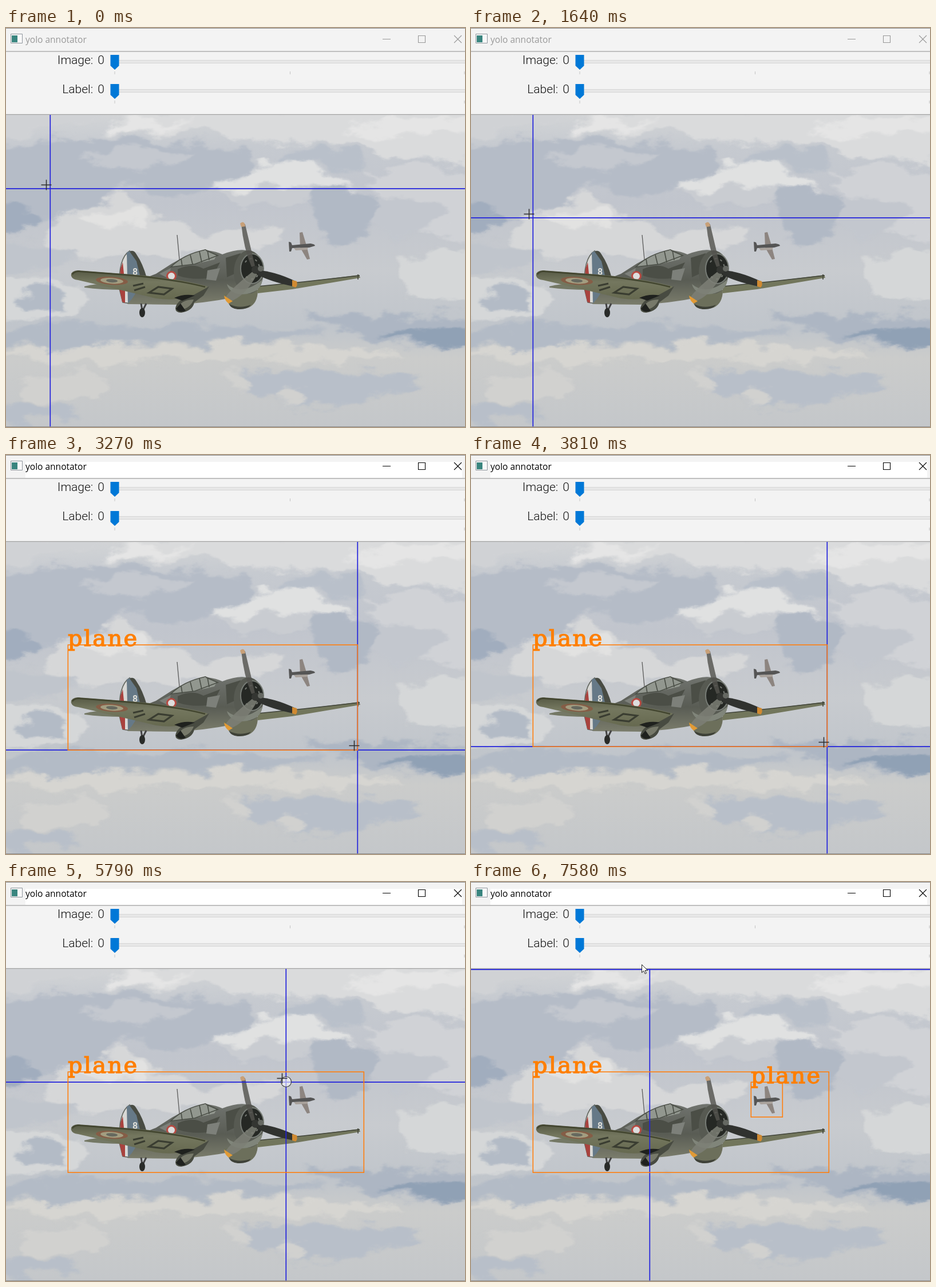
Animation of 802 by 698 pixels, one loop 8000 ms. Source, as an HTML page:

```html
<!DOCTYPE html>
<html lang="en">
<head>
<meta charset="utf-8">
<title>yolo annotator</title>
<style>
  html, body { margin: 0; width: 100%; height: 100%; overflow: hidden; background: #f3f3f3; }
  svg { position: absolute; left: 0; top: 0; width: 802px; height: 698px; }
  .title { font: 15.5px "Open Sans", sans-serif; }
  .field { font: 300 21px Roboto, sans-serif; word-spacing: 3px; text-anchor: end; fill: #111; }
  .tag { font: 40px "DejaVu Serif", serif; letter-spacing: 2.4px; fill: #ff7f00; stroke: #ff7f00; stroke-width: 1.3; }
  .box { fill: none; stroke: #ff7f0e; stroke-width: 1.6; }
  #cross { stroke: #2222dc; stroke-width: 1.7; }
</style>
</head>
<body>
<svg viewBox="0 0 802 698">
  <defs>
    <linearGradient id="sky" x2="0" y2="1">
      <stop stop-color="#d2d4d6"/>
      <stop offset=".1" stop-color="#c6cad0"/>
      <stop offset=".28" stop-color="#c1c5cd"/>
      <stop offset=".5" stop-color="#c8cbcf"/>
      <stop offset=".68" stop-color="#c0c5cb"/>
      <stop offset=".78" stop-color="#cbcccb"/>
      <stop offset="1" stop-color="#c4c7ca"/>
    </linearGradient>
    <filter id="ragged" filterUnits="userSpaceOnUse" x="-40" y="110" width="882" height="640" color-interpolation-filters="sRGB">
      <feTurbulence type="fractalNoise" baseFrequency=".016 .03" numOctaves="5" seed="7" result="n"/>
      <feGaussianBlur in="SourceGraphic" stdDeviation="2.5"/>
      <feDisplacementMap in2="n" scale="50" xChannelSelector="R" yChannelSelector="G"/>
    </filter>
    <filter id="soft"><feGaussianBlur stdDeviation=".7"/></filter>
    <clipPath id="photo"><path d="M0 152H802V697H0Z"/></clipPath>
    <linearGradient id="body" x2="0" y2="1">
      <stop stop-color="#70736e"/>
      <stop offset=".55" stop-color="#595c54"/>
      <stop offset="1" stop-color="#7b7d6c"/>
    </linearGradient>
    <linearGradient id="wing" x2="0" y2="1">
      <stop stop-color="#565944"/>
      <stop offset=".4" stop-color="#74775f"/>
      <stop offset="1" stop-color="#66694f"/>
    </linearGradient>
  </defs>

  <g clip-path="url(#photo)">
    <path fill="url(#sky)" d="M0 152H802V698H0Z"/>
    <g filter="url(#ragged)">
      <path fill="#d0d2d5" d="M-30 140H200Q150 185-30 186Z"/>
      <path fill="#b5bcc7" d="M-30 208Q150 186 300 200T420 215Q440 260 370 280Q270 300 240 272Q190 265 170 300Q120 318 80 335L-30 350Z"/>
      <path fill="#c4c8cf" d="M130 225Q230 205 330 222Q280 250 190 246Z"/>
      <path fill="#a1adbe" d="M-30 318Q30 308 62 332Q40 358-30 366Z"/>
      <path fill="#dadbdc" d="M170 186Q200 140 300 140H840V235Q710 235 640 215Q560 190 470 200Q380 195 300 180Z"/>
      <path fill="#e5e5e5" d="M600 172Q680 150 830 150V180Q700 195 600 182ZM180 170Q240 155 330 165Q260 180 180 182Z"/>
      <path fill="#b9c0ca" d="M490 215Q560 200 610 222Q640 235 620 255Q560 246 490 230Z"/>
      <path fill="#d0d2d6" d="M630 250Q720 235 840 250V360Q730 370 650 330Z"/>
      <path fill="#b1b9c5" d="M530 292Q580 276 630 290Q660 320 640 350Q610 385 565 370Q530 355 530 292Z"/>
      <path fill="#c3c7ce" d="M640 300Q720 290 762 320Q745 350 690 370Q650 360 640 300Z"/>
      <path fill="#e0e1e1" d="M370 280Q380 250 420 250Q440 226 480 232Q520 226 540 250Q580 258 622 280Q560 288 500 278Q440 298 370 280Z"/>
      <path fill="#c9ccd1" d="M375 285Q450 268 540 285Q530 318 450 312Q400 310 375 285Z"/>
      <path fill="#d6d7d8" d="M78 350Q90 320 130 320Q140 298 180 302Q200 275 215 288Q220 318 250 326Q300 345 340 360Q420 340 490 345Q480 395 400 390L110 400Q50 390 78 350Z"/>
      <path fill="#e2e2e1" d="M125 332Q160 312 215 322Q245 330 250 348Q180 354 125 332Z"/>
      <path fill="#c0c5cc" d="M-30 375Q60 368 125 395Q110 428-30 428Z"/>
      <path fill="#d5d7d8" d="M680 400Q760 375 840 385V485Q740 490 690 450ZM-30 445Q60 432 128 445Q160 480 120 505Q60 520-30 500Z"/>
      <path fill="#b3bbc6" d="M15 470Q40 448 90 456Q110 470 98 490Q50 500 15 470ZM-30 540Q100 510 260 525Q420 505 560 538Q500 556 300 548Q120 560-30 560Z"/>
      <path fill="#adb6c3" d="M520 508Q640 495 840 503V560Q680 568 520 508Z"/>
      <path fill="#90a1b5" d="M650 532Q720 518 840 525V560Q740 562 650 532Z"/>
      <path fill="#d6d5d1" d="M-30 575Q120 546 240 560Q360 546 520 560Q640 558 710 575Q560 588 400 580Q200 598-30 575Z"/>
      <path fill="#b8bfc9" d="M400 602Q560 592 720 612Q742 640 640 642Q560 675 440 658ZM-30 665Q50 645 130 670Q90 690-30 690Z"/>
      <path fill="#d1d1cf" d="M30 622Q80 596 120 600Q170 605 180 640Q120 650 40 650ZM375 600Q410 592 428 630Q400 640 375 600ZM470 655Q490 620 528 636Q520 668 470 660Z"/>
    </g>

    <g filter="url(#soft)">
      <!-- far plane -->
      <path fill="#8d8580" d="M513 358L518 357L524 377L531 404L526 405L514 384Z"/>
      <path fill="#555" d="M494 374L498 375L500 380L532 377Q540 378 540 381L530 384L500 385L498 391L495 391Z"/>
      <path fill="#a9a29c" d="M503 385L528 384L526 388L506 389Z"/>

      <!-- right wing, stabiliser and fin -->
      <path fill="#72765c" d="M440 452L520 444L617 432L619 437L560 447L500 457L440 464Z"/>
      <path fill="none" stroke="#41443a" stroke-width="1.6" d="M440 452L520 444L618 433M615 431V440"/>
      <path fill="#747865" d="M137 452Q165 445 206 448V458Q165 458 137 454Z"/>
      <path fill="#d8d8d5" stroke="#62665f" stroke-width="1.6" d="M198 456Q196 402 216 390L218 482L204 480Z"/>
      <path fill="#a9423e" d="M198 455L208 457V481L203 479ZM200 421L204 410L206 430L199 436Z"/>
      <path fill="#667987" d="M211 393Q218 388 224 391L240 440L238 482L213 482Z"/>
      <path fill="#494c43" d="M216 391Q223 387 228 396Q239 412 246 437L236 441L228 408Z"/>
      <text x="221" y="432" style="font:bold 16px Roboto,sans-serif" fill="#dcdcd6">8</text>

      <!-- fuselage -->
      <path fill="url(#body)" d="M236 440L262 430L290 412Q320 394 352 389Q368 391 378 396Q404 386 420 389L440 402V456Q424 470 394 472Q350 481 296 484L212 483Q230 465 236 440Z"/>
      <path fill="#4b4e46" d="M300 422Q325 410 345 421L374 410L360 437Q325 442 300 433ZM384 402L410 394L404 428L386 436Z"/>
      <path fill="#7d807a" d="M268 430L288 420L284 438ZM352 424L374 420L367 442L350 440Z"/>
      <path fill="#92978f" d="M288 418Q310 396 346 389L368 398L364 405L330 413Z"/>
      <path fill="none" stroke="#4c5048" stroke-width="1.7" d="M288 418Q310 396 348 388L370 398L330 413ZM306 404L308 417M322 397L326 413M338 391L342 410M352 389L355 406"/>
      <circle cx="289" cy="434" r="7.5" fill="#ddd" stroke="#b64a42" stroke-width="3"/>
      <path fill="none" stroke="#5b5b5b" stroke-width="1.3" d="M299 362L303 405"/>

      <!-- left wing -->
      <path fill="url(#wing)" d="M114 434Q112 425 126 424L205 430Q300 437 352 452Q345 466 316 472Q288 477 262 473L190 456L126 441Q116 440 114 434Z"/>
      <path fill="none" stroke="#42452f" stroke-width="2.5" d="M116 431Q120 425 130 426L210 432Q300 440 348 453"/>
      <g transform="rotate(4 182 442)">
        <ellipse cx="185" cy="442" rx="28" ry="7" fill="#855d46"/>
        <ellipse cx="185" cy="442" rx="20" ry="5" fill="#a39d80"/>
        <ellipse cx="185" cy="442" rx="10" ry="3" fill="#66695f"/>
      </g>
      <path fill="none" stroke="#3a3d31" stroke-width="3.2" d="M222 451L240 447M224 459L243 453M250 463L266 453L290 456L276 466Z"/>

      <!-- wheels -->
      <path fill="#484b41" d="M296 490Q299 474 326 468L355 452L345 468L329 480Q326 495 306 498Q296 498 296 490Z"/>
      <path fill="#77796a" d="M302 486Q310 475 328 475Q322 490 306 493Z"/>
      <path fill="#1f211e" d="M294 472Q312 464 330 468L308 477ZM297 491L305 482L314 495Q302 499 297 491Z"/>
      <path fill="#6c6f5b" d="M381 466L440 458Q440 482 424 489Q398 496 390 484Z"/>
      <path fill="#3e4138" d="M390 483Q408 492 428 484Q422 493 405 492Q393 491 390 483Z"/>
      <path stroke="#444" stroke-width="3" d="M236 482L238 494M245 482L240 492"/>
      <ellipse cx="238" cy="498" rx="5" ry="8" fill="#292b29"/>

      <!-- engine and propeller -->
      <ellipse cx="424" cy="427" rx="26" ry="38" fill="#575a52"/>
      <path fill="#80857a" d="M386 448Q412 470 448 440Q446 464 412 466Q390 464 386 448Z"/>
      <ellipse cx="430" cy="421" rx="20" ry="26" fill="#252824" stroke="#777c76" stroke-width="2"/>
      <path fill="none" stroke="#777b75" stroke-width="2" stroke-dasharray="4 6" d="M418 410A14 18 0 1 1 419 434"/>
      <path fill="#53544f" fill-opacity=".82" d="M411 342Q415 339 418 344L435 416L429 418Q415 385 411 342Z"/>
      <path fill="#c8a078" d="M409 342Q414 337 417 342L418 347L411 348Z"/>
      <path fill="#30322f" d="M440 424Q468 425 506 443Q510 450 502 452Q463 444 440 432Z"/>
      <path fill="#d08a32" d="M500 441L508 443Q510 451 506 454L500 452Z"/>
      <path fill="#7d7f76" fill-opacity=".85" d="M431 426L439 431Q416 471 392 478L383 472Q390 459 431 426Z"/>
      <path fill="#e19a35" d="M381 468L390 474L396 478L389 482Q382 477 381 468Z"/>
      <circle cx="436" cy="423" r="7" fill="#343632"/>
      <circle cx="445" cy="421" r="5" fill="#656862"/>
    </g>
  </g>

  <!-- window -->
  <path fill="none" stroke="#8c8c8c" d="M0 .5H802M0 41H802M0 151.3H802M0 697.5H802"/>
  <path id="active" fill="#fff" d="M34 12H797V40H34Z"/>
  <path fill="#f8f8f8" stroke="#8e969c" d="M8.5 10.5H28.5V26.5H8.5Z"/>
  <path fill="#39857f" d="M10 13H20V25H10Z"/>
  <g id="caption" fill="#999">
    <text class="title" x="34" y="26">yolo annotator</text>
  </g>
  <path id="buttons" fill="none" stroke="#999" stroke-width="1.1" d="M658 19.5H672M720.5 13.5H732.5V25.5H720.5ZM783 13L796 26M796 13L783 26"/>
  <text class="field" x="172" y="63">Image: 0</text>
  <text class="field" x="172" y="114">Label: 0</text>
  <path fill="#e7e7e7" stroke="#d6d6d6" d="M184 56.5H810V61.5H184ZM184 107.5H810V112.5H184Z"/>
  <path fill="none" stroke="#c4c4c4" d="M190 76V81M496.5 76V81M801 76V81M190 127V132M801 127V132"/>
  <path fill="#0078d7" d="M182.5 47H197.5V66L190 73L182.5 66ZM182.5 98H197.5V117L190 124L182.5 117Z"/>
</svg>

<svg viewBox="0 0 802 698">
  <path id="cross" fill="none"/>
  <g class="mark"><rect class="box"/><text class="tag">plane</text></g>
  <g class="mark"><rect class="box"/><text class="tag">plane</text></g>
  <circle id="click" r="9" fill="#fff" fill-opacity=".55" stroke="#333" stroke-width="1.1"/>
  <path id="plus" fill="none" stroke="#2c2c2c" stroke-width="1.5" d="M-8.5 .5H9.5M.5-8.5V9.5"/>
  <path id="arrow" fill="#fff" stroke="#222" d="M.5 .5V14.5L3.8 11.4L6.2 16.6L8.4 15.6L6.1 10.6H10.6Z"/>
</svg>

<script>
const $ = id => document.getElementById(id);
const LOOP = 8000, LEAD = .45, PRESS = [1930, 5790], RELEASE = [4240, 7160];

// first change, last change, steps, target x and y, easing power
const moves = [
  [290, 940, 6, 125, 327, .8],
  [1250, 1640, 4, 108, 332, .8],
  [1930, 1930, 1, 108, 332],
  [2070, 2490, 4, 462, 488],
  [2620, 2880, 3, 527, 506],
  [3000, 3270, 3, 614, 516],
  [3420, 3960, 4, 625, 508],
  [4240, 4640, 4, 564, 418, 1.6],
  [4770, 4770, 1, 522, 367],
  [4900, 5180, 3, 491, 350, .7],
  [5300, 5420, 2, 489, 350],
  [5790, 5790, 1, 489, 350],
  [5940, 6600, 6, 544, 411, .9],
  [7160, 7580, 4, 312, 153]
];

const poses = [{ t: 0, x: 77, y: 281 }];
for (const [t0, t1, n, x, y, power = 1] of moves) {
  const from = poses[poses.length - 1];
  for (let i = 1; i <= n; i++) {
    const e = (i / n) ** power;
    poses.push({
      t: n > 1 ? t0 + (t1 - t0) * (i - 1) / (n - 1) : t0,
      x: Math.round(from.x + (x - from.x) * e),
      y: Math.round(from.y + (y - from.y) * e)
    });
  }
}

// the pointer runs slightly ahead of the lines while moving
poses.forEach((p, i) => {
  const next = poses[i + 1];
  const lead = next && next.t - p.t < 200 && !PRESS.includes(p.t) ? LEAD : 0;
  p.cx = p.x - 7 + (lead && lead * (next.x - p.x));
  p.cy = p.y - 7 + (lead && lead * (next.y - p.y));
});
Object.assign(poses[poses.length - 1], { cx: 298, cy: 144 });

const poseAt = t => poses.findLast(p => p.t <= t + .01);
const show = (el, on) => el.style.display = on ? "" : "none";
const place = (el, x, y) => el.setAttribute("transform", `translate(${x} ${y})`);
const attrs = (el, o) => { for (const k in o) el.setAttribute(k, o[k]); };
const marks = document.querySelectorAll(".mark");

function draw(t) {
  const p = poseAt(t), on = t >= PRESS[0];
  const outside = p.cy < 151;
  $("cross").setAttribute("d", `M0 ${p.y + .2}H802M${p.x + .3} 152V697`);

  marks.forEach((g, i) => {
    const a = poseAt(PRESS[i]), b = poseAt(Math.min(t, RELEASE[i] - 1));
    show(g, t >= PRESS[i] && b.x > a.x);
    if (b.x <= a.x) return;
    attrs(g.firstChild, { x: a.x + .3, y: a.y + .2, width: b.x - a.x, height: Math.max(0, b.y - a.y) });
    attrs(g.lastChild, { x: a.x, y: a.y + 2 });
  });

  show($("click"), PRESS.includes(p.t));
  place($("click"), p.x + .5, p.y - .5);
  show($("plus"), !outside);
  show($("arrow"), outside);
  place($(outside ? "arrow" : "plus"), Math.round(p.cx), Math.round(p.cy));

  show($("active"), on);
  $("caption").setAttribute("fill", on ? "#000" : "#999");
  $("buttons").setAttribute("stroke", on ? "#000" : "#999");
}

const start = performance.now();
function tick() {
  draw((performance.now() - start) % LOOP);
  requestAnimationFrame(tick);
}
tick();
</script>
</body>
</html>
```
